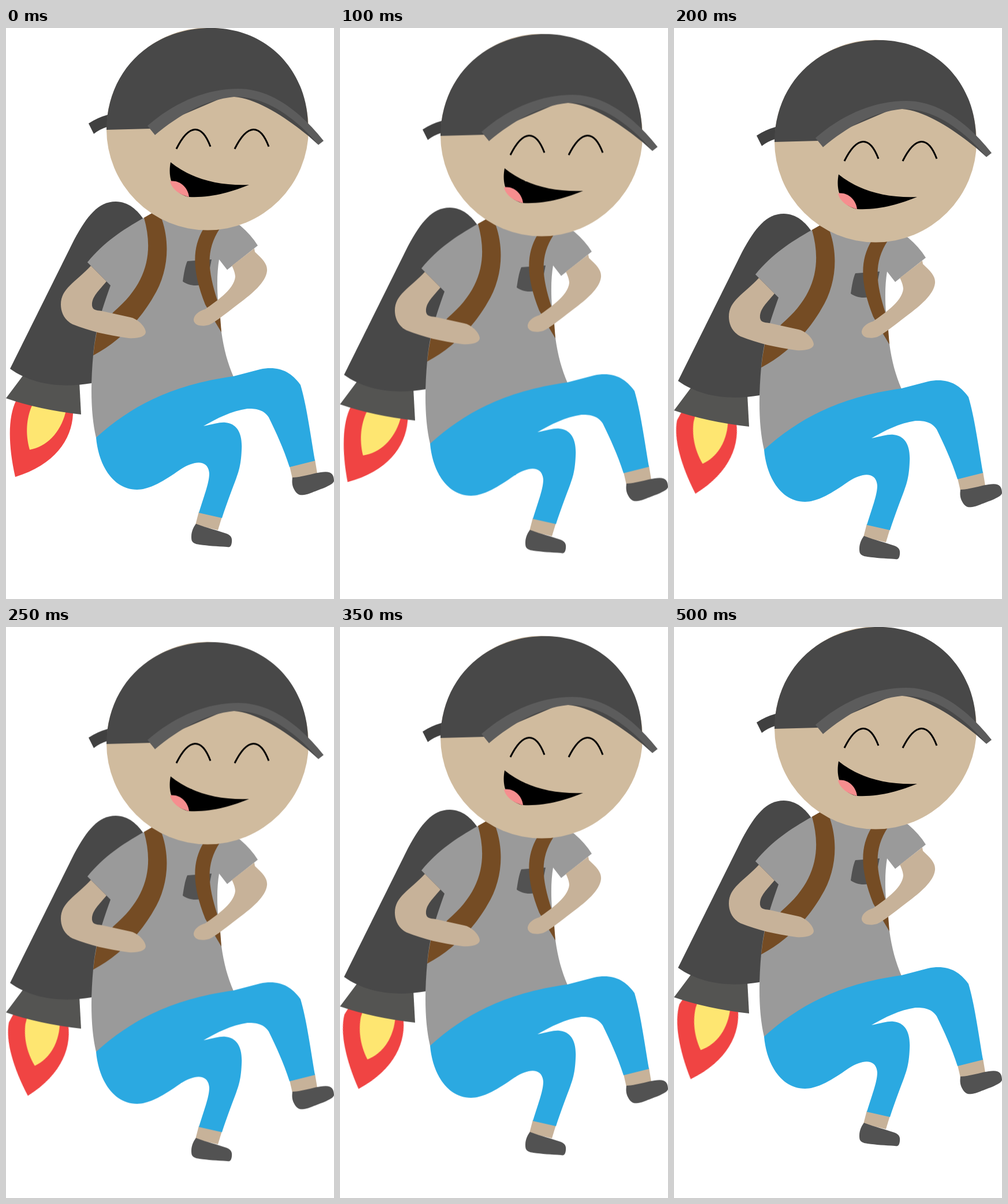
An HTML page that plays this animation: 568x987 px, repeating every 0.55 s.

```html
<!DOCTYPE html>
<html lang="en">
<head>
<meta charset="utf-8">
<title>Jetpack</title>
<style>
html, body { margin: 0; width: 100%; height: 100%; overflow: hidden; background: #fff; }
svg { display: block; width: 568px; height: 987px; }
#flame { transform-origin: 58px 697px; }
.dark { fill: #484848; }
.grey { fill: #9a9a9a; }
.skin { fill: #c7b299; }
.strap { fill: #754c24; }
.shoe { fill: #525252; }
</style>
</head>
<body>
<svg viewBox="0 0 568 987">
  <g id="flyer">
    <g id="flame">
      <path fill="#f04443" d="M17 645C4 672 3 718 16 776C84 755 114 712 116 667L117 655L90 625L33 628Z"/>
      <path fill="#fee671" d="M44 655C36 675 33 700 41 729C70 724 94 700 103 665L107 650L54 637Z"/>
    </g>
    <path fill="#545452" d="M30 600L0 640Q58 660 130 668L127 612Z"/>
    <path class="dark" d="M7 589L118 366C140 325 160 300 190 300C212 300 228 315 240 333L260 400L148 614C95 623 45 616 7 589Z"/>

    <path class="grey" d="M141 405C170 370 200 350 239 328L253 320L300 300L405 341Q425 358 436 376L383 418L369 400C364 430 365 470 373 525C377 555 384 580 394 603L380 625L180 700L156 708C147 670 146 620 151 565C155 520 165 490 181 445Z"/>
    <path class="shoe" d="M314 403L356 400L348 440C335 447 318 447 306 438C308 425 310 412 314 403Z"/>
    <path class="strap" d="M239 328L253 320L270 331C285 375 280 425 255 465C235 500 200 540 151 566Q153 545 157 526L186 491C247 440 255 385 239 328Z"/>
    <path class="strap" d="M342 347C322 380 322 420 345 478L361 506L373 526L371 500L366 471C350 420 345 385 370 347Z"/>

    <path class="skin" d="M147 411L174 438C160 455 148 465 149 480C150 487 155 488 165 489L215 500C230 503 242 518 242 526C241 534 228 537 212 536C175 531 145 524 115 512C100 504 95 490 95 478C95 450 120 440 147 411Z"/>
    <path class="skin" d="M430 381L431 387C445 400 453 408 452 420C450 440 425 460 405 475C385 490 365 507 352 513C338 517 326 514 325 505C325 495 337 488 345 486C360 475 395 453 397 430C397 425 394 416 391 411Z"/>

    <path class="skin" d="M491 757L535 746L539 770L496 779Z"/>
    <path class="skin" d="M334 836L374 845L367 868L328 859Z"/>
    <path fill="#2ba9e1" d="M156 708C215 655 285 617 394 602L440 590C470 584 492 592 510 617C520 650 527 700 535 748L491 759C480 725 468 700 455 673C445 658 430 658 418 658C390 662 365 675 342 688C360 685 370 681 380 682C400 684 410 700 408 730C406 770 400 770 374 847L334 838C345 803 352 785 352 770C350 745 325 745 292 770C265 788 245 798 227 798C185 798 160 755 156 708Z"/>
    <path class="shoe" d="M496 777C515 776 530 770 545 768C562 765 568 770 568 783C567 790 545 797 530 803C512 810 506 808 501 801C495 792 495 785 496 777Z"/>
    <path class="shoe" d="M329 857C350 865 365 868 382 874C390 877 392 882 391 889C390 896 388 898 383 897C365 896 350 895 335 893C322 891 321 887 321 879C321 870 325 862 329 857Z"/>

    <circle cx="349" cy="174.5" r="175" fill="#d0bb9e"/>
    <path fill="#404040" d="M143 165Q158 155 176 150L175 171Q162 175 152 183Z"/>
    <path class="dark" d="M174 176C175 70 255 0 355 0C450 0 520 70 523 165L395 112L250 174Z"/>
    <path class="dark" d="M395 119C435 122 485 155 523 186L541 202L500 140L400 110Z"/>
    <path fill="#5c5c5c" d="M245 169C290 130 345 105 402 105C460 105 510 145 550 195L541 202C497 150 445 117 395 119C345 124 300 150 258 185Z"/>

    <g fill="none" stroke="#000" stroke-width="3">
      <path d="M295 209C317 165 339 165 354 205"/>
      <path d="M396 209C418 165 440 165 455 205"/>
    </g>
    <path d="M285 232C320 260 365 273 421 271C392 283 355 294 317 292C298 289 278 270 285 232Z"/>
    <path fill="#f68e8f" d="M284 265C300 262 315 275 317 292C304 289 288 281 284 265Z"/>
  </g>
</svg>
<script>
const STEP = 50;
const drop = [0, 5.3, 10.5, 15.8, 21, 26.2, 21, 15.8, 10.5, 5.3, 0];
const tilt = [0, 2.3, 2.1, -4.8, -14.5, -15, -13.1, -11.2, -9.7, -9.2, -9];

// Holds each value for one step, then jumps to the next.
function play(id, values, toTransform) {
  const n = values.length;
  const frames = [...values, values[n - 1]].map((v, i) => ({
    offset: i / n,
    transform: toTransform(v),
    easing: 'steps(1, end)'
  }));
  document.getElementById(id).animate(frames, { duration: n * STEP, iterations: Infinity });
}

play('flyer', drop, y => `translateY(${y}px)`);
play('flame', tilt, a => `rotate(${a}deg)`);
</script>
</body>
</html>
```
